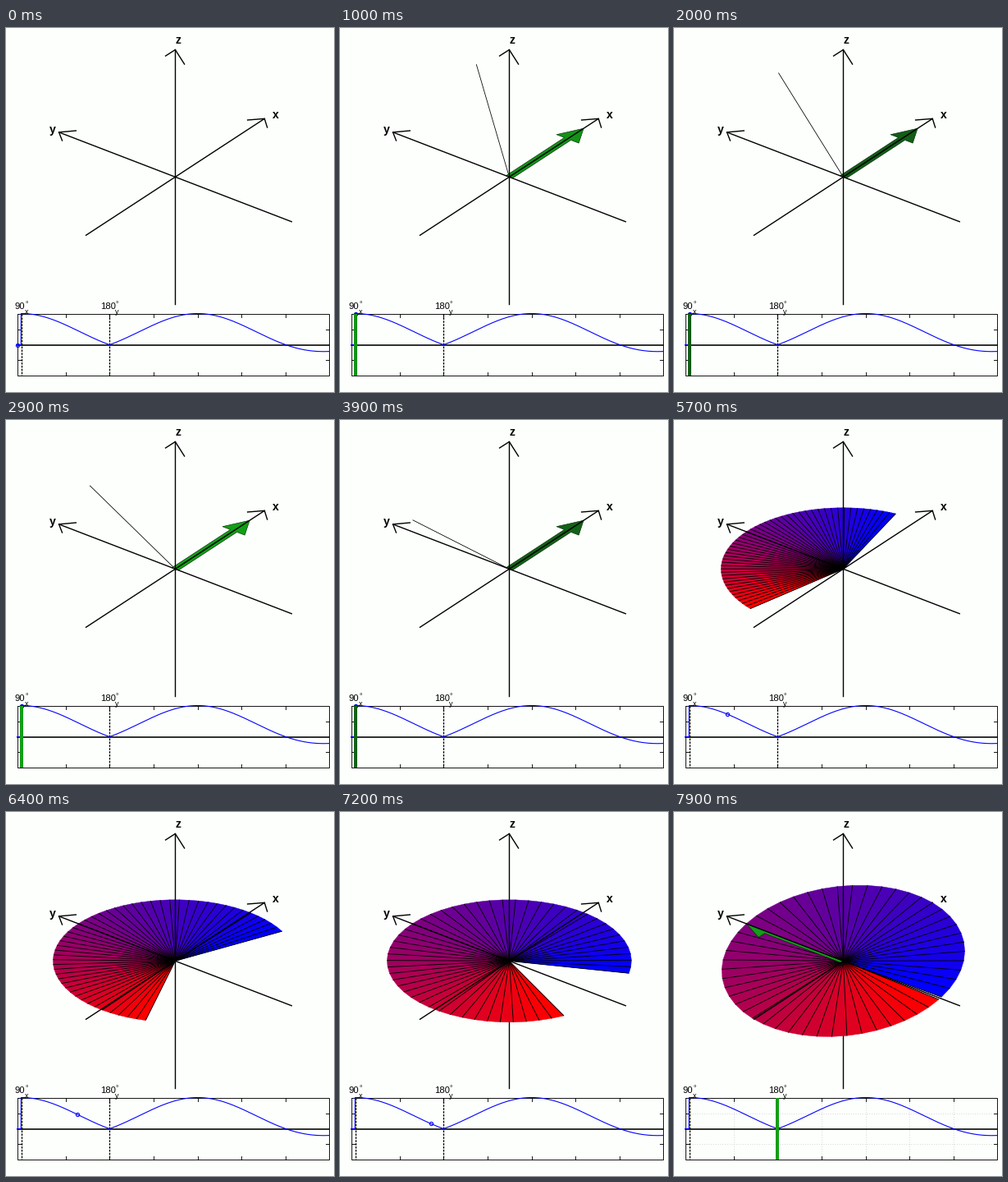
Recreate the animation shown at these times as a matplotlib script. Size 400x443 px, loop 8000 ms.

```python
import numpy as np
import matplotlib.pyplot as plt
from matplotlib.animation import FuncAnimation
from matplotlib.collections import LineCollection, PolyCollection

W, H, DPI = 400, 443, 100
FRAMES, STEP = 80, 100
PX = 72 / DPI
INK, BLUE, PAPER = "black", "#0000ff", "#fdfffd"

# Orthographic view: 30 degree elevation, unit vectors in screen pixels
O = np.array([206.4, 181.3])
R, AZ = 149, np.radians(52.5)
X = R * np.array([np.cos(AZ), -np.sin(AZ) / 2])
Y = R * np.array([-np.sin(AZ), -np.cos(AZ) / 2])
Z = R * np.array([0, -np.cos(np.pi / 6)])

# Timeline
FREE_START, FLIP_START = 42, 77
WEDGES = 50

# Signal plot
LEFT, RIGHT, TOP, BASE, BOTTOM = 13.5, 393.5, 347.5, 385.5, 422.5
T90, T180 = 18.9, 126.3
TAU = T180 - T90

fig = plt.figure(figsize=(W / DPI, H / DPI), dpi=DPI, facecolor=PAPER)
ax = fig.add_axes([0, 0, 1, 1])
ax.set_xlim(0, W)
ax.set_ylim(H, 0)
ax.axis("off")


def line(pts, width=1.4, color=INK, z=5, **kw):
    xs, ys = zip(*pts)
    return ax.plot(xs, ys, color=color, lw=width * PX, zorder=z, **kw)[0]


def label(x, y, s, size, **kw):
    ax.text(x, y, s, fontsize=size * PX, family="Liberation Sans",
            color=INK, zorder=8, **kw)


def signal(x):
    """Dephasing before the refocusing pulse, echo after it."""
    x = np.asarray(x, float)
    u = np.where(x < T180, x - T90, x - T180 - TAU) / TAU
    return BASE - (BASE - TOP) * np.sinc(u)


def arrow(along, side, halves=(1, -1)):
    """Flat block arrow of unit length, or just one half of it."""
    prof = [(0, 0.034), (0.785, 0.034), (0.785, 0.115), (1, 0)]
    pts = [O + a * along + halves[0] * w * side for a, w in prof]
    if len(halves) == 2:
        pts += [O + a * along + halves[1] * w * side for a, w in prof[-2::-1]]
    else:
        pts.append(O)
    return plt.Polygon(pts, ec="#062806", lw=0.6 * PX, zorder=4, visible=False)


# Axes of the rotating frame
line([O, O + 1.2 * Z])
line([O, O - 1.2 * Z], z=1)
line([O + 1.2 * Y, O - 1.2 * Y])
line([O, O - 1.2 * X])
line([(194.6, 34), O + 1.2 * Z, (217.6, 44)])
line([(85.3, 125), O + 1.2 * Y, (68.5, 137)])
x_axis = [line([O, O + 1.2 * X]),
          line([(294.6, 112), O + 1.2 * X, (318.6, 121)])]
for name, x, y in (("z", 209.5, 18.7), ("x", 328.8, 110), ("y", 56.6, 128.2)):
    label(x, y, name, 14, weight="bold", ha="center")

# Plot frame, ticks and grid
line([(LEFT, TOP), (RIGHT, TOP), (RIGHT, BOTTOM), (LEFT, BOTTOM), (LEFT, TOP)],
     0.9)
grid = []
for i in range(1, 7):
    x = T90 + i * TAU / 2
    line([(x, TOP), (x, TOP + 4)], 0.9)
    line([(x, BOTTOM), (x, BOTTOM - 4)], 0.9)
    grid.append([(x, TOP), (x, BOTTOM)])
for y in (366.5, 403.8):
    line([(LEFT, y), (LEFT + 4, y)], 0.9)
    line([(RIGHT, y), (RIGHT - 4, y)], 0.9)
    grid.append([(LEFT, y), (RIGHT, y)])
grid = LineCollection(grid, colors="#c4c4c4", linewidths=0.8 * PX,
                      linestyles=(0, (1, 2.5)), zorder=2)
ax.add_collection(grid)

line([(LEFT, BASE), (RIGHT, BASE)], 1.6)
for t in (T90, T180):
    line([(t, TOP), (t, BOTTOM)], 1.3, ls=(0, (2, 1)))
curve = np.linspace(T90, RIGHT, 400)
line([(LEFT, BASE), (T90 - 0.7, BASE), (T90 - 0.5, TOP),
      *zip(curve, signal(curve))], 1.1, BLUE, 6)

for x, num, axis in ((10.8, "90", "x"), (114.8, "180", "y")):
    end = x + 6.2 * len(num)
    label(x, 342.3, num, 11.3)
    label(end, 339.3, "°", 9)
    label(end, 347.8, axis, 9)

# Moving parts
marker, = ax.plot([], [], "o", ms=4.2 * PX, mfc="none", mec=BLUE,
                  mew=1.1 * PX, zorder=6)
bar = plt.Rectangle((0, TOP), 4, BOTTOM - TOP, lw=0, zorder=7, visible=False)
arrow_x = arrow(X, Y)
arrow_y = arrow(Y, X, (-1,))
for patch in (bar, arrow_x, arrow_y):
    ax.add_patch(patch)
spin = line([O, O], 0.8, z=3)

mix = np.linspace(0, 1, WEDGES)
fan = PolyCollection([], facecolors=[(m, 0, 1 - m) for m in mix],
                     edgecolors="face", linewidths=0.3, zorder=3)
spokes = LineCollection([], colors=INK, linewidths=0.9 * PX, zorder=3.5)
ax.add_collection(fan)
ax.add_collection(spokes)


def update(k):
    tip = 0 < k < FREE_START
    flip = k >= FLIP_START
    free = k >= FREE_START

    # Pulse glow
    green = (0.07, 0.49 + 0.13 * np.cos(2 * np.pi * (k - 29) * 3 / 50), 0.09)
    for patch, on in ((bar, tip or flip), (arrow_x, tip), (arrow_y, flip)):
        patch.set_visible(on)
        patch.set_facecolor(green)
    bar.set_x((T180 if flip else T90) - 2)
    grid.set_visible(flip)

    # Tipping from z to y
    theta = np.radians(min(90, 2.2 * (k - 1)))
    end = O + np.cos(theta) * Z + np.sin(theta) * Y
    spin.set_data(*zip(O, end))
    spin.set_visible(tip)

    # Fanning out about z, then turning over around y
    u = np.clip(0.0282 * (k - 41.65), 0, 0.994)
    beta = np.radians(4.9 * max(0, k - FLIP_START))
    tilted = np.cos(beta) * X + np.sin(beta) * Z
    a = np.pi * u * np.linspace(-1, 1, WEDGES + 1)
    rim = O + np.outer(np.cos(a), Y) - np.outer(np.sin(a), tilted)
    fan.set_verts([[O, p, q] for p, q in zip(rim, rim[1:])] if free else [])
    spokes.set_segments([[O, p] for p in rim] if free else [])
    for part in x_axis:
        part.set_zorder(1 if beta > 0 else 5)

    if k == 0:
        marker.set_data([LEFT], [BASE])
    else:
        now = T90 + TAU * u
        marker.set_data([now], [float(signal(now))])


anim = FuncAnimation(fig, update, frames=FRAMES, interval=STEP,
                     init_func=lambda: update(0), repeat=True, repeat_delay=0)
plt.show()
```
